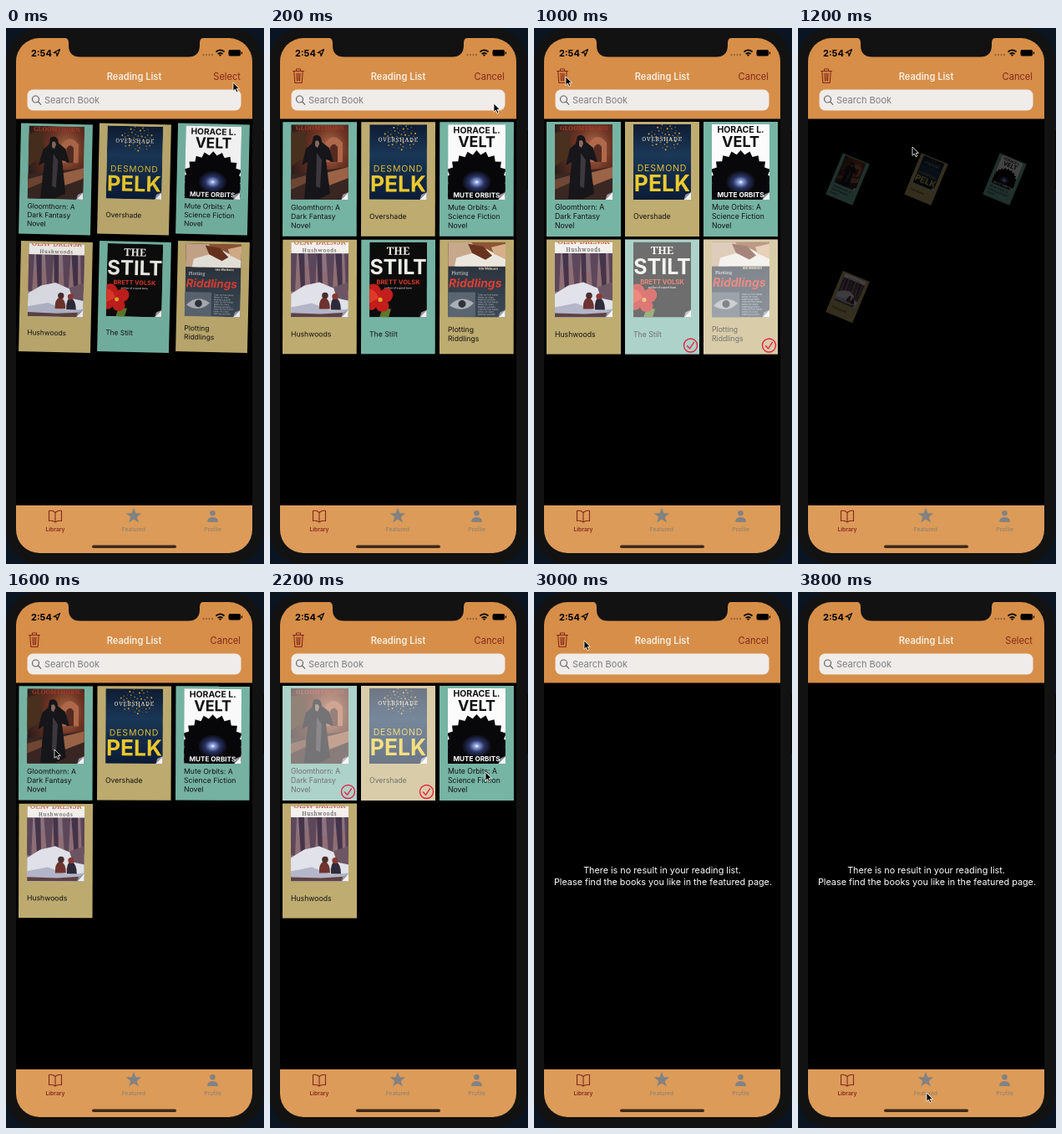
These frames come from a looping animation (309 px wide and 640 px high, 4000 ms). An HTML page:

```html
<!DOCTYPE html>
<html lang="en">
<head>
<meta charset="utf-8">
<title>Reading list</title>
<style>
  html, body { margin: 0; width: 100%; height: 100%; overflow: hidden; background: #0b1522; }
  #stage { display: block; width: 309px; height: 640px; font-family: Inter, Roboto, sans-serif; }
  .serif { font-family: "Noto Serif", "Liberation Serif", serif; }
  .mid { text-anchor: middle; }
  .end { text-anchor: end; }
  .bold { font-weight: 700; }
  .wide { letter-spacing: .8px; }
  .line { fill: none; stroke: #85291c; stroke-width: 1.1; stroke-linejoin: round; stroke-linecap: round; }
</style>
</head>
<body>
<svg id="stage" viewBox="0 0 309 640">
  <defs>
    <clipPath id="screen"><rect x="12" y="12" width="283" height="615" rx="28"/></clipPath>
    <radialGradient id="ember" cx=".68" cy=".32" r=".75">
      <stop offset="0" stop-color="#b5714c"/><stop offset=".4" stop-color="#6e3524"/><stop offset="1" stop-color="#2a1c1a"/>
    </radialGradient>
    <linearGradient id="night" x2="0" y2="1">
      <stop offset="0" stop-color="#0f1c33"/><stop offset=".4" stop-color="#1b3858"/><stop offset="1" stop-color="#0b1c38"/>
    </linearGradient>
    <radialGradient id="glow">
      <stop offset="0" stop-color="#fff"/><stop offset=".15" stop-color="#8fa3dd"/><stop offset=".5" stop-color="#2a3566"/><stop offset="1" stop-color="#08080b"/>
    </radialGradient>
    <linearGradient id="slate" x2="0" y2="1">
      <stop offset="0" stop-color="#262b33"/><stop offset="1" stop-color="#3d4a57"/>
    </linearGradient>
  </defs>

  <rect width="309" height="640" fill="#0b1522"/>
  <rect x="305" y="122" width="4" height="71" rx="1" fill="#080808"/>
  <rect width="307.5" height="640" rx="39" fill="#121212"/>

  <g clip-path="url(#screen)">
    <rect x="12" y="12" width="283" height="615"/>
    <rect x="12" y="12" width="283" height="96.5" fill="#d68e48"/>
    <g id="cards"></g>
    <g id="empty" class="mid" fill="#fff" font-size="10.8">
      <text x="153.5" y="336">There is no result in your reading list.</text>
      <text x="154.5" y="350">Please find the books you like in the featured page.</text>
    </g>
    <rect x="12" y="570" width="283" height="57" fill="#dc9b59"/>
  </g>
  <path d="M69 11.5q6 0 6 6v3q0 14 14 14h129q14 0 14-14v-3q0-6 6-6z" fill="#121212"/>

  <!-- status bar -->
  <text x="30" y="33.5" font-size="11" class="bold">2:54</text>
  <path d="M57 29.5l7.5-4-3.3 8-.6-3.6z" fill="none" stroke="#000" stroke-width="1.2" stroke-linejoin="round"/>
  <g fill="#8a5b30"><circle cx="236.5" cy="32" r="1"/><circle cx="240" cy="32" r="1"/><circle cx="243.5" cy="32" r="1"/><circle cx="247" cy="32" r="1"/></g>
  <path d="M251.5 28.5q5-4.2 10 0M253.6 31q2.9-2.3 5.8 0" fill="none" stroke="#000" stroke-width="1.8"/>
  <path d="M254.9 32q1.6-1.2 3.2 0l-1.6 1.9z"/>
  <rect x="266.5" y="26" width="14.5" height="7.5" rx="2"/><rect x="281.8" y="28.3" width="1.2" height="3" rx=".6"/>

  <!-- navigation -->
  <text x="153.5" y="62" class="mid" font-size="11.1" font-weight="600" fill="#f7eee2">Reading List</text>
  <text id="mode" x="281" y="62" class="end" font-size="11.1" fill="#85291c"></text>
  <path id="trash" class="line" d="M27.5 51.5h13M31.5 51.5v-2.5h5v2.5M28.8 51.5l1 14h8.4l1-14M32 54l.4 9M34 54v9M36 54l-.4 9"/>
  <rect x="25.5" y="73.5" width="256" height="25" rx="7" fill="#efecea"/>
  <g fill="none" stroke="#65656a" stroke-width="1.2" stroke-linecap="round"><circle cx="35.5" cy="85" r="4"/><path d="M38.5 88l3.3 3.3"/></g>
  <text x="46" y="90" font-size="11" fill="#7d7d81">Search Book</text>

  <!-- tabs -->
  <path class="line" d="M59 578.5q-3.5-3-7.5-2v12q4-1 7.5 1.5q3.500-2.500 7.500-1.500v-12q-4-1-7.500 2v11.500"/>
  <path id="star" fill="#828282"/>
  <g fill="#828282"><circle cx="247.5" cy="579.3" r="3.3"/><path d="M241 590q0-6 6.5-6t6.5 6z"/></g>
  <g class="mid" font-size="6.7" font-weight="500" fill="#94826e">
    <text x="59" y="600.5" font-weight="600" fill="#85291c">Library</text>
    <text x="153" y="600.5">Featured</text>
    <text x="247.5" y="600.5">Profile</text>
  </g>
  <rect x="103" y="617.5" width="101" height="3.6" rx="1.8" fill="#3b2a1b"/>

  <path id="cursor" d="M0 0v10.3l2.4-2.2 1.7 3.7 1.8-.8-1.7-3.6h3.2z" stroke="#fff" stroke-width=".8"/>
</svg>

<script>
const $ = id => document.getElementById(id);
const TEAL = '#76b4a4', TAN = '#bfac70';

// Star-shaped outline alternating between two radii
const spikes = (cx, cy, n, outer, inner) => Array.from({ length: 2 * n }, (_, i) => {
  const a = i * Math.PI / n - Math.PI / 2, r = i % 2 ? inner : outer;
  return `${i ? 'L' : 'M'}${(cx + r * Math.cos(a)).toFixed(1)} ${(cy + r * Math.sin(a)).toFixed(1)}`;
}).join('') + 'z';

const label = (x, y, size, fill, text, extra = '') =>
  `<text x="${x}" y="${y}" font-size="${size}" fill="${fill}" ${extra}>${text}</text>`;
const centred = (y, size, fill, text, cls = 'bold') =>
  label(34.5, y, size, fill, text, `class="mid ${cls}"`);
const box = (x, y, w, h, fill) => `<rect x="${x}" y="${y}" width="${w}" height="${h}" fill="${fill}"/>`;
const dot = (x, y, r, fill) => `<circle cx="${x}" cy="${y}" r="${r}" fill="${fill}"/>`;
const shape = (d, fill) => `<path d="${d}" fill="${fill}"/>`;
const repeat = (n, draw) => Array.from({ length: n }, (_, i) => draw(i)).join('');

const sparks = repeat(60, i => {
  const a = i * 2.4, r = 2.6 * Math.sqrt(i);
  return dot(38 + r * Math.cos(a), 15 + r * Math.sin(a) * .8, .4 + i % 3 * .3, i % 2 ? '#d9a441' : '#8f7a3c');
});
const trees = repeat(7, i =>
  shape(`M${i * 11 - 2} 13l${2 + i % 3} 46h5l${i % 2 ? -1 : 2}-46z`, i % 2 ? '#46344a' : '#5d475a'));
const credits = repeat(9, i =>
  label(36, 64 + i * 2.9, 2.7, '#c9cdd2', ['Tales by five hands', 'Notes on clues', 'Making a puzzle'][i % 3]));

const books = [
  { color: TEAL, title: ['Gloomthorn: A', 'Dark Fantasy', 'Novel'], art:
    box(0, 0, 69, 90, 'url(#ember)') +
    shape('M0 10l16-3 4 30L0 50z', '#49301f') + shape('M41 45V22q10-14 21 0v23z', '#b0694a') +
    shape('M47 45V27q5-7 9 0v18z', '#552c22') + shape('M0 60l69-9v39H0z', '#3a2723') +
    shape('M42 58l27-7v13l-23 9z', '#9c6447') + shape('M0 66l18-5v9L0 78z', '#6f4735') +
    shape('M27 14q9-4 10 7l9 7 5 17-9-3 5 41-13 6H16l4-44-7 4 5-20 7-6z', '#17161a') +
    shape('M29 20q4-3 5 3l-2 5-3-2z', '#8a6a5e') + shape('M31 34l6 9-2 33-5-2z', '#3d3a3f') +
    centred(6.5, 7.5, '#a33b2b', 'GLOOMTHORN', 'serif bold') },
  { color: TAN, title: ['Overshade'], art:
    box(0, 0, 69, 90, 'url(#night)') + sparks +
    centred(20.5, 6.8, '#f3ead8', 'OVERSHADE', 'serif wide') +
    centred(56.5, 10.6, '#e2c232', 'DESMOND', 'wide') + centred(80.5, 26.5, '#edca2d', 'PELK') },
  { color: TEAL, title: ['Mute Orbits: A', 'Science Fiction', 'Novel'], art:
    box(0, 0, 69, 90, '#fbfbfb') + shape(spikes(34.5, 70, 22, 39, 34), '#08080b') + box(0, 75, 69, 15, '#08080b') +
    '<ellipse cx="34.5" cy="69" rx="18" ry="14" fill="url(#glow)"/>' +
    centred(10.5, 10.5, '#111', 'HORACE L.') + centred(27, 18, '#111', 'VELT') +
    centred(87.5, 8.2, '#fff', 'MUTE ORBITS') },
  { color: TAN, title: ['Hushwoods'], art:
    box(0, 0, 69, 90, '#8b7480') + shape('M0 38l20-10 20 8 29-11v34H0z', '#8f6f74') + trees +
    shape('M0 62l16-10 18-4 17 7 18 2v33H0z', '#e1e2ea') + shape('M51 54l18-6v22l-14-3z', '#6d5664') +
    shape('M0 78l25-5 24 9 20-2v12H0z', '#b4b6ca') + shape('M0 85l36 1 33-2v6H0z', '#5f4344') +
    shape('M34 80q-1-12 6-14 7 2 7 14z', '#6f3430') + dot(41, 64, 3.8, '#4a2e2e') +
    shape('M48 81q-1-13 5-15 7 3 7 15z', '#2f2b3a') + dot(53, 65, 3.6, '#8a3a34') +
    box(0, 0, 69, 13.5, '#f4f1ed') + centred(2.8, 9, '#c23a2c', 'OLAV DRENSK', 'serif') +
    centred(11.8, 6.2, '#3b3638', 'Hushwoods', 'serif wide') },
  { color: TEAL, title: ['The Stilt'], art:
    box(0, 0, 69, 90, '#0c0d0c') + centred(15, 13, '#f0eee8', 'THE', 'serif bold') +
    centred(38.5, 25, '#f0eee8', 'STILT') + centred(50.5, 7.6, '#dc3a28', 'BRETT VOLSK') +
    centred(56, 3.2, '#bbb', 'author of a quiet barn') +
    shape('M12 90l4-11 10 1-3 10z', '#5d7a2c') +
    shape('M0 51q10-4 14 7 10-6 14 3 1 8-6 11 4 7-3 11-9 2-11-5-4 5-8 3z', '#c41f1d') +
    shape('M0 56q9 2 11 11l-11 6z', '#e23a2a') + dot(13, 69, 2.6, '#d9a92c') },
  { color: TAN, title: ['Plotting', 'Riddlings'], art:
    box(0, 0, 69, 90, 'url(#slate)') + box(0, 0, 69, 29, '#8f5535') +
    shape('M0 0h28l6 9-14 20H0z', '#c9a98c') + shape('M10 19l36-11 23 12v9H8z', '#ece8e0') +
    shape('M24 2l18 3 11 11-8 5-16-8z', '#69341f') + shape('M52 6l17-4v18l-14-6z', '#d8b08a') +
    label(4, 39, 5.5, '#eee', 'Plotting', 'class="serif"') +
    label(37, 33, 4, '#e8d9bd', 'Ida Welkorn', 'class="bold"') +
    label(1, 54, 14, '#df3f34', 'Riddlings', 'class="bold" font-style="italic"') +
    box(0, 60, 33, 30, '#5b6671') + shape('M2 76q13-14 29-3-12 13-29 3z', '#aab0b5') +
    dot(17, 74, 4.5, '#2e353c') + credits },
];
// Moment each book gets ticked
const tickedAt = [1800, 2000, 2400, 2600, 800, 600];

const curl = shape('M69 81l-8.5 9H69z', '#f2f2f4') + shape('M69 81l-8.5 9 2-6z', '#9a9ca4');
const check = `<g fill="none" stroke="#e62645" stroke-width="1.4" stroke-linecap="round" stroke-linejoin="round">
  <circle cx="78.5" cy="126.5" r="8"/><path d="M74.5 127l3 3.3 5-7.5"/></g>`;

const card = ({ color, title, art }) => `<g class="card">
  ${box(0, 0, 89, 137, color)}
  <svg x="10" y="3" width="69" height="90">${art}${curl}</svg>
  ${title.map((s, i) => label(10, 116.2 + (i - (title.length - 1) / 2) * 10.8, 8.7, '#111', s)).join('')}
  <g class="tick">${box(0, 0, 89, 137, 'rgba(255,255,255,.4)')}${check}</g></g>`;

$('cards').innerHTML = books.map(card).join('');
$('star').setAttribute('d', spikes(153, 582.5, 5, 9.8, 4));
const cards = [...document.querySelectorAll('.card')];
const ticks = [...document.querySelectorAll('.tick')];

// Pointer path: time, x, y
const path = [[0, 272, 65], [200, 268, 90], [600, 231, 317], [800, 150, 315], [1000, 38, 58],
  [1200, 137, 142], [1600, 58, 188], [1800, 60, 190], [2000, 152, 194], [2200, 258, 215],
  [2400, 70, 318], [2600, 56, 40], [2800, 35, 57], [3000, 60, 58], [3400, 263, 58], [3800, 154, 598]];

function pointer(t) {
  const i = path.findIndex(p => p[0] >= t), b = path[i], a = path[Math.max(0, i - 1)];
  const k = b === a ? 0 : (t - a[0]) / (b[0] - a[0]);
  return [a[1] + (b[1] - a[1]) * k, a[2] + (b[2] - a[2]) * k];
}

const show = (el, on) => el.setAttribute('display', on ? 'inline' : 'none');

function draw(t) {
  // Cards spin and grow into place, the gap shrinking exponentially
  const gap = t < 1200 ? .035 * Math.exp(-t / 85) : .61 * Math.exp((1200 - t) / 85);
  const editing = t >= 200 && t < 3400;
  cards.forEach((el, i) => {
    const x = 59.5 + i % 3 * 94, y = 180.5 + Math.floor(i / 3) * 140.5;
    show(el, t < (i < 4 ? 2800 : 1200));
    show(ticks[i], t >= tickedAt[i]);
    el.setAttribute('opacity', 1 - 1.2 * gap);
    el.setAttribute('transform', `translate(${x} ${y}) rotate(${37 * gap}) scale(${1 - gap}) translate(-44.5 -68.5)`);
  });
  show($('empty'), t >= 2800);
  show($('trash'), editing);
  $('mode').textContent = editing ? 'Cancel' : 'Select';
  $('cursor').setAttribute('transform', `translate(${pointer(t)})`);
}

const start = performance.now();
function tick() {
  const t = (performance.now() - start) % 4000;
  draw(Math.floor(t / 200) * 200);
  requestAnimationFrame(tick);
}
tick();
</script>
</body>
</html>
```
